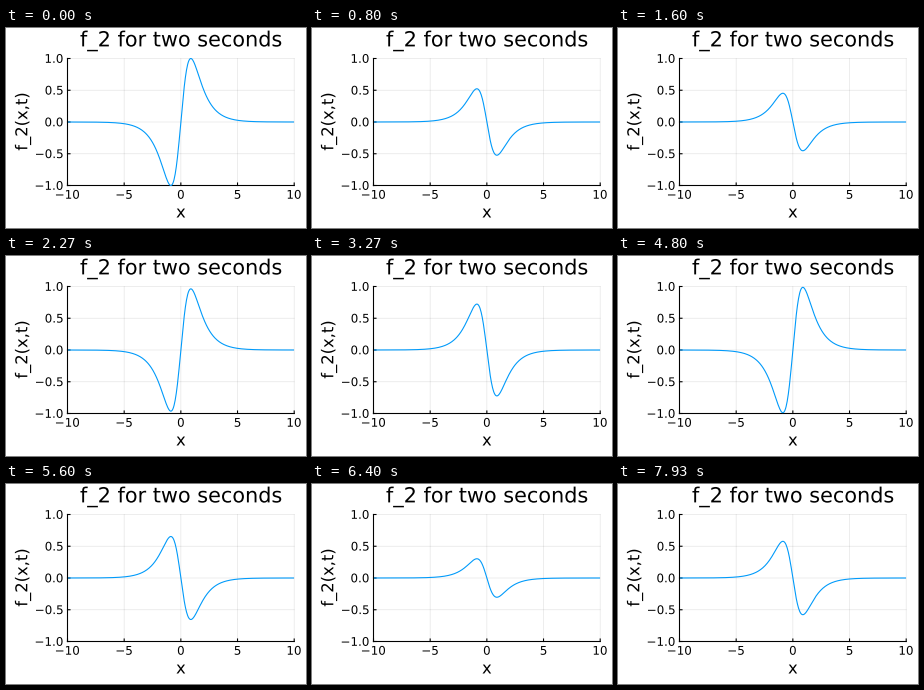
Animation of 300 by 200 pixels, one loop 8000 ms. Source, as a matplotlib script:

```python
import numpy as np
import matplotlib.pyplot as plt
from matplotlib.animation import FuncAnimation
from matplotlib.patches import PathPatch, Rectangle
from matplotlib.textpath import TextPath
from matplotlib.transforms import Affine2D

W, H, DPI = 300, 200, 100
LOOP, TICK = 8000, 20           # ms
STEP = LOOP / 120               # time between poses, ms
OMEGA = np.sqrt(2) / 8          # phase advance per pose
LEFT, RIGHT, TOP, BOTTOM = 61.5, 288.2, 30.5, 157.5
PX = 72 / DPI                   # points per pixel

plt.rcParams["font.family"] = "DejaVu Sans"
fig = plt.figure(figsize=(W / DPI, H / DPI), dpi=DPI, facecolor="white")
ax = fig.add_axes([0, 0, 1, 1])
ax.set(xlim=(0, W), ylim=(H, 0))
ax.axis("off")


def to_x(x):
    return LEFT + (x + 10) / 20 * (RIGHT - LEFT)


def to_y(v):
    return TOP + (1 - v) / 2 * (BOTTOM - TOP)


def line(xs, ys, color="black", width=1.1, **kw):
    return ax.plot(xs, ys, color=color, lw=width * PX, snap=False, **kw)[0]


def label(x, y, text, size, align=0.5, angle=0):
    """Text as outlines; align is the share of its width left of x."""
    path = TextPath((0, 0), text, size=size)
    box = path.get_extents()
    place = Affine2D().translate(-box.x0 - align * box.width, 0).scale(1, -1)
    place.rotate_deg(-angle).translate(x, y)
    ax.add_patch(PathPatch(place.transform_path(path), fc="black", lw=0, snap=False))


def number(text):
    return text.replace("-", "\u2212")


for x in range(-10, 11, 5):
    px = to_x(x)
    line([px, px], [TOP, BOTTOM], (0, 0, 0, 0.1), 0.7)
    line([px, px], [BOTTOM, BOTTOM - 2.5], zorder=4)
    label(px, 170.7, number(str(x)), 11.9)

for v in np.arange(-1, 1.1, 0.5):
    py = to_y(v)
    line([LEFT, RIGHT], [py, py], (0, 0, 0, 0.1), 0.7)
    line([LEFT, LEFT + 2.5], [py, py], zorder=4)
    label(56.6, py + 4.3, number(f"{v:.1f}"), 11.9, align=1)

line([LEFT, RIGHT], [BOTTOM, BOTTOM], zorder=4)
line([LEFT, LEFT], [TOP, BOTTOM], zorder=4)

mid = (LEFT + RIGHT) / 2
label(mid, 18.4, "f_2 for two seconds", 20.8)
label(mid, 189.5, "x", 16.35)
label(21.3, to_y(0), "f_2(x,t)", 16.35, angle=90)

xs = np.linspace(-10, 10, 401)
shape = 2 * np.tanh(xs) / np.cosh(xs)
curve = line(to_x(xs), to_y(shape), "#009AFA", 1.1, zorder=5)
curve.set_clip_path(Rectangle((LEFT, TOP - 0.5), RIGHT - LEFT, BOTTOM - TOP + 1,
                              transform=ax.transData))


def update(i):
    pose = int((i * TICK + 15) / STEP)   # poses snap to the coarser clock
    curve.set_ydata(to_y(shape * np.cos(OMEGA * pose)))
    return curve,


anim = FuncAnimation(fig, update, frames=LOOP // TICK, interval=TICK,
                     repeat=True, repeat_delay=0, blit=False)
plt.show()
```
